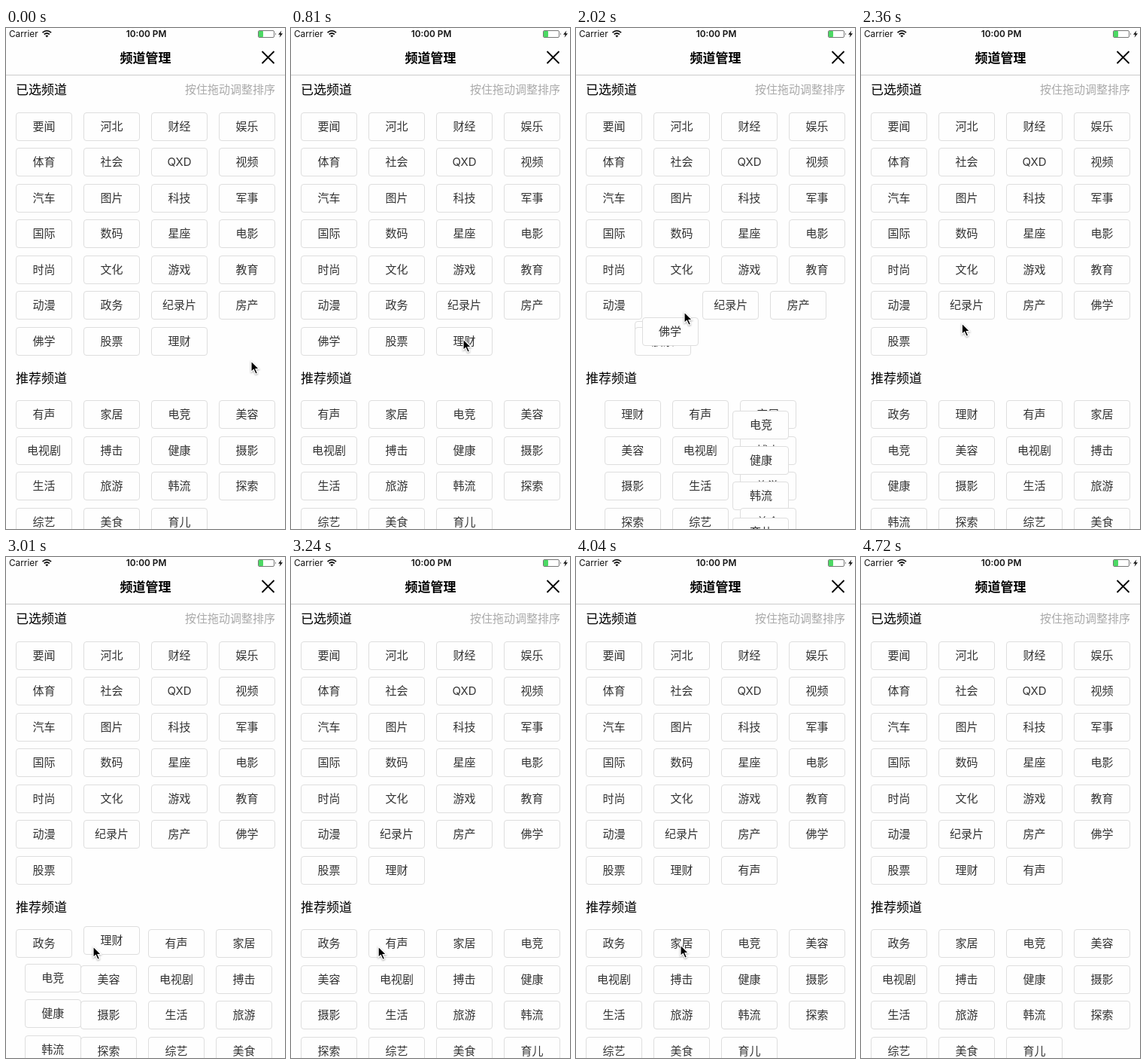
An HTML page for the animation above (5080 ms loop, 371 px wide and 665 px high).

```html
<!DOCTYPE html>
<html lang="zh-CN">
<head>
<meta charset="utf-8">
<style>
html, body { margin: 0; width: 100%; height: 100%; overflow: hidden; background: #fefefe; }
body { position: relative; font-family: Inter, "Noto Sans CJK SC", "Noto Sans CJK", sans-serif; }
body > * { position: absolute; white-space: nowrap; }
.cell {
  box-sizing: border-box; width: 75px; height: 38px; border: 1px solid #dedede; border-radius: 4px;
  background: #fefefe; color: #333; font-size: 15px; line-height: 36px; text-align: center;
}
.label { z-index: 8; line-height: 24px; font-size: 17px; color: #000; }
.status { font: 11.8px/16px Inter, Roboto, sans-serif; top: 0; color: #111; }
svg { left: 0; top: 0; overflow: visible; }
#cursor { z-index: 9; left: -1px; top: -1px; }
</style>
</head>
<body>
<div class="status" style="left:4px">Carrier</div>
<div class="status" style="left:0;width:373px;text-align:center;font-weight:600">10:00 PM</div>
<div class="label" style="left:0;width:371px;top:28px;text-align:center;font-weight:700">频道管理</div>
<div class="label" style="left:13px;top:70px">已选频道</div>
<div class="label" style="right:13px;top:70px;font-size:15px;color:#aaa">按住拖动调整排序</div>
<div class="label" style="left:13px;top:453px">推荐频道</div>
<svg width="371" height="64" fill="none">
  <path d="M0 62.5H371" stroke="#ccc"/>
  <path d="M340.500 31L356.500 47M356.500 31L340.500 47" stroke="#000" stroke-width="1.800"/>
  <path d="M48.500 6.200Q54.300 1.200 60.100 6.200M50.700 8.500Q54.300 5.500 57.900 8.500" stroke="#111" stroke-width="1.700"/>
  <path d="M52.300 10.300Q54.300 8.700 56.300 10.300L54.300 12.500Z" fill="#111"/>
  <rect x="335.500" y="3.500" width="21" height="9" rx="1.500" stroke="#777"/>
  <rect x="336" y="4" width="6" height="8" rx="1" fill="#4cd964"/>
  <path d="M358 6.300Q360 8 358 9.700Z" fill="#777"/>
  <path d="M366.300 3.500L362 8.800H364.700L363.500 12.700L368 7.300H365.300Z" fill="#111"/>
</svg>
<svg id="cursor" width="12" height="20">
  <path d="M0 0V14.500L3.300 11.500L5.900 17.300L8.500 16.200L6 10.500H10.500Z" fill="#000" stroke="#fff" stroke-width="1.200"
    style="filter:drop-shadow(0 1px 1px #0005)"/>
</svg>
<script>
const LOOP = 5080, MOVE = 250;
const sections = [
  "要闻 河北 财经 娱乐 体育 社会 QXD 视频 汽车 图片 科技 军事 国际 数码 星座 电影 时尚 文化 游戏 教育 动漫 政务 纪录片 房产 佛学 股票 理财",
  "有声 家居 电竞 美容 电视剧 搏击 健康 摄影 生活 旅游 韩流 探索 综艺 美食 育儿"
].map(s => s.split(" "));
const tail = sections[1].slice(12);

// [start time, channel, target section]
const moves = [[1177, "理财", 1], [1930, "政务", 1], [2974, "理财", 0], [3742, "有声", 0]];
// [time, x, y]
const path = [
  [0, 327, 443], [580, 327, 443], [810, 230, 414], [1450, 230, 414], [1620, 147, 381], [1670, 145, 378],
  [2320, 145, 378], [2530, 95, 455], [2710, 117, 518], [3240, 117, 518], [3460, 140, 516],
  [4200, 140, 516], [4720, 346, 668], [LOOP, 346, 668]
];

const layout = () => {
  const slots = {};
  sections.forEach((list, section) => list.forEach((name, i) => {
    const row = Math.floor(i / 4);
    slots[name] = { section, row, x: 13 + 90 * (i % 4), y: (section ? 494.4 : 112) + 47.49 * row };
  }));
  return slots;
};

const cells = sections.flat().map(name => {
  const el = document.createElement("div");
  el.className = "cell";
  el.textContent = name;
  document.body.append(el);
  return { name, el };
});

const layouts = [layout()];
for (const [, name, to] of moves) {
  const from = sections[1 - to];
  from.splice(from.indexOf(name), 1);
  if (to) sections[1].unshift(name); else sections[0].push(name);
  layouts.push(layout());
}

const mix = (a, b, p) => a + (b - a) * p;

// cubic-bezier(.42, 0, .58, 1)
function easeInOut(t) {
  if (t <= 0 || t >= 1) return t <= 0 ? 0 : 1;
  let lo = 0, hi = 1, s;
  for (let i = 0; i < 20; i++) {
    s = (lo + hi) / 2;
    const x = 1.26 * s * (1 - s) ** 2 + 1.74 * s * s * (1 - s) + s ** 3;
    if (x < t) lo = s; else hi = s;
  }
  return s * s * (3 - 2 * s);
}

// Cells changing section pass below the others, cells changing row pass above.
function depth(name, a, b) {
  if (a.section !== b.section) return 1;
  return (a.row !== b.row ? 3 : 2) + (tail.includes(name) ? 2 : 0);
}

const cursor = document.getElementById("cursor");

function draw(now) {
  const t = now % LOOP;
  const step = Math.max(0, moves.filter(m => m[0] <= t).length - 1);
  const p = easeInOut((t - moves[step][0]) / MOVE);
  for (const { name, el } of cells) {
    const a = layouts[step][name], b = layouts[step + 1][name];
    el.style.left = mix(a.x, b.x, p) + "px";
    el.style.top = mix(a.y, b.y, p) + "px";
    el.style.zIndex = depth(name, a, b);
  }
  const k = path.findIndex(point => point[0] > t);
  const [t0, x0, y0] = path[k - 1], [t1, x1, y1] = path[k];
  const q = (t - t0) / (t1 - t0);
  cursor.style.transform = `translate(${mix(x0, x1, q)}px, ${mix(y0, y1, q)}px)`;
}

const start = performance.now();
(function tick() {
  draw(performance.now() - start);
  requestAnimationFrame(tick);
})();
</script>
</body>
</html>
```
